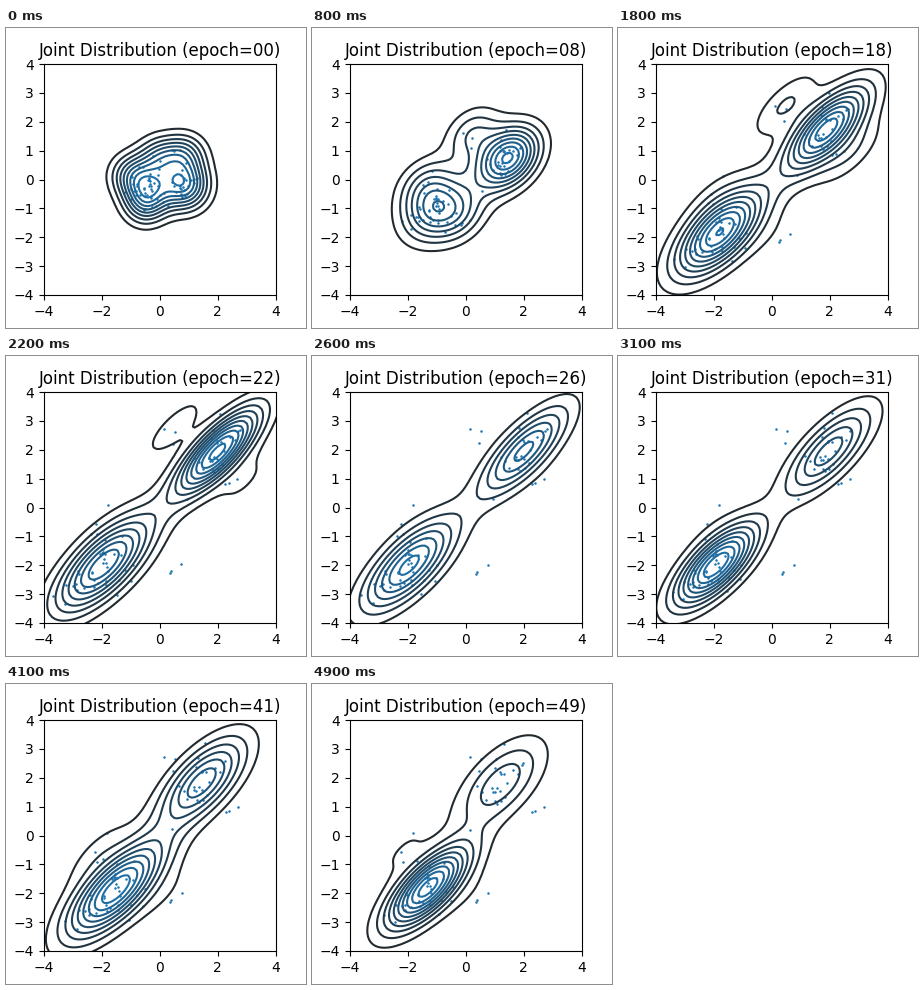
Recreate the animation shown at these times as a matplotlib script. Size 300 px wide and 300 px high, loop 5 s.

```python
import numpy as np
import matplotlib.pyplot as plt
from matplotlib.animation import FuncAnimation
from matplotlib.colors import LinearSegmentedColormap

EPOCHS, INTERVAL = 50, 100
SPLIT_END = 22    # the two clusters have separated
DRIFT_START = 28  # they begin to lean back towards the middle

# Centres of the lower and upper cluster at the start, far apart, and at the end.
START = np.array([(-.35, -.25), (.85, -.2)])
APART = np.array([(-1.95, -2.0), (2.0, 1.95)])
FINAL = np.array([(-1.3, -1.8), (1.2, 1.8)])

# Four small stray groups: a ring around the start, then homes beside the clusters.
STRAY_START = np.array([(0, .75), (.85, .85), (-.95, .15), (-.5, -.85)])
STRAY_HOME = np.array([(.5, 2.8), (2.95, .9), (-2.2, -.5), (.4, -2.0)])
STRAY_WEIGHT = np.array([.045, .03, .035, .02])

GROUP_SIZES = [36, 24, 3, 3, 3, 3]
rng = np.random.default_rng(7)
latent = rng.normal(size=(sum(GROUP_SIZES), 2))
group = np.repeat(np.arange(6), GROUP_SIZES)

axis = np.linspace(-6, 6, 121)
X, Y = np.meshgrid(axis, axis)
cmap = LinearSegmentedColormap.from_list("dark_blue", ["#222222", "#1f77b4"])


def mix(a, b, amount):
    return a + (b - a) * amount


def progress(epoch, first, last):
    return np.clip((epoch - first) / (last - first), 0, 1)


def smooth(p):
    return p * p * (3 - 2 * p)


def components(epoch):
    """Rows of weight, x, y, sx, sy, rho: two clusters, then the strays."""
    grow = np.sin(np.pi / 2 * progress(epoch, 0, 24) ** 1.2)
    drift = smooth(progress(epoch, DRIFT_START, EPOCHS - 1))
    late = progress(epoch, SPLIT_END, EPOCHS - 1)
    pulse = .5 - .5 * np.cos(2 * np.pi * (epoch - SPLIT_END) / 18)

    lower, upper = mix(mix(START, APART, grow), FINAL, drift)
    lower_weight = mix(.2, .5 + .08 * pulse + .0022 * (epoch - SPLIT_END), grow)
    upper_weight = mix(.3, .41 - .12 * late, grow)
    lower_size = mix(.55, 1.13 - .17 * pulse, grow)
    upper_size = mix(.55, 1, grow)
    rows = [
        (lower_weight, *lower, lower_size, lower_size, .72 * grow),
        (upper_weight, *upper, upper_size, upper_size * 1.03,
         (.8 - .2 * late) * grow),
    ]

    early = 1 - progress(epoch, 20, 30)
    presence = np.array([early, early, late, late])
    weights = mix(.13, STRAY_WEIGHT * presence, grow)
    size = mix(.5, .8, grow)
    for weight, place in zip(weights, mix(STRAY_START, STRAY_HOME, grow)):
        rows.append((weight, *place, size, size, .8 * grow))
    return np.array(rows)


def density(parts):
    total = np.zeros_like(X)
    for w, x, y, sx, sy, rho in parts:
        u, v, q = (X - x) / sx, (Y - y) / sy, 1 - rho ** 2
        norm = w / (2 * np.pi * sx * sy * np.sqrt(q))
        total += norm * np.exp(-(u * u + v * v - 2 * rho * u * v) / (2 * q))
    return total


def samples(parts):
    _, x, y, sx, sy, rho = parts[group].T
    rho = rho * .6
    spread = np.where(group < 2, .62, .4)
    a, b = latent.T
    return (x + spread * sx * a,
            y + spread * sy * (rho * a + np.sqrt(1 - rho ** 2) * b))


fig, ax = plt.subplots(figsize=(3, 3), dpi=100)


def draw(epoch):
    ax.clear()
    parts = components(epoch)
    ax.scatter(*samples(parts), s=1, linewidths=.8, color="#1f77b4")
    ax.contour(X, Y, density(parts), 10, cmap=cmap, linewidths=1.5)
    ax.set(xlim=(-4, 4), ylim=(-4, 4),
           xticks=range(-4, 5, 2), yticks=range(-4, 5))
    ax.set_title(f"Joint Distribution (epoch={epoch:02d})")
    return []


anim = FuncAnimation(fig, draw, frames=EPOCHS, interval=INTERVAL,
                     init_func=lambda: [], repeat=True, repeat_delay=0)
plt.show()
```
